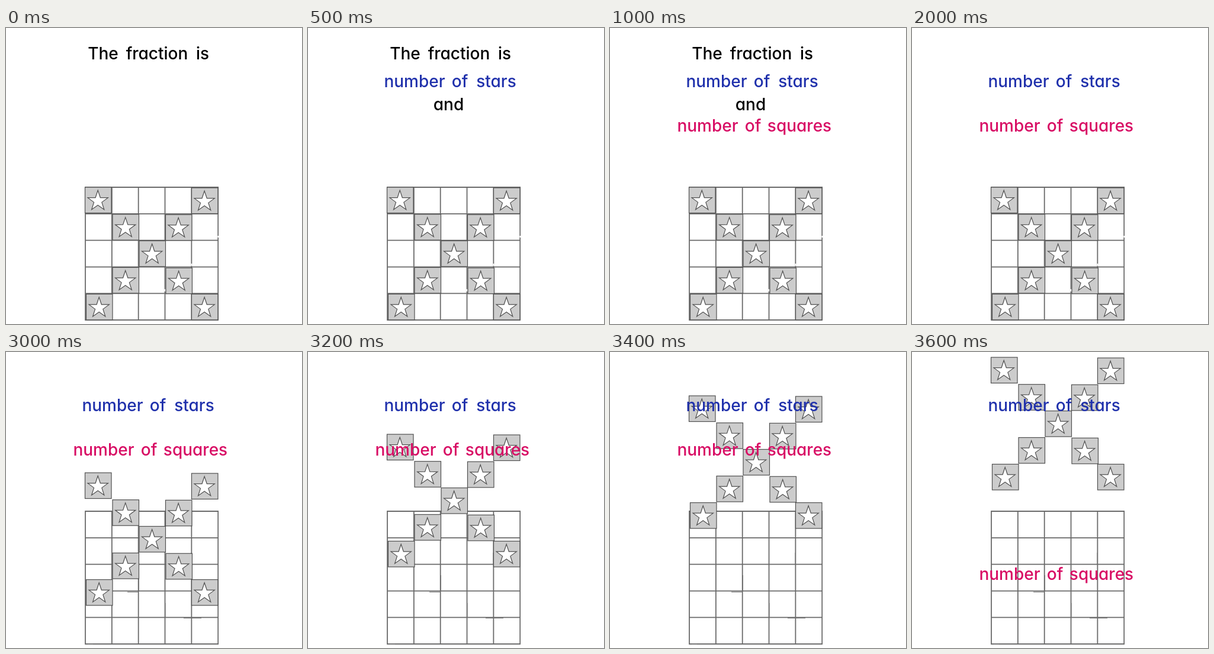
These frames come from a looping animation (500x500 px, 4600 ms). An HTML page:

```html
<!DOCTYPE html>
<html lang="en">
<head>
<meta charset="utf-8">
<title>Fraction of stars</title>
<style>
  html, body { margin: 0; width: 100%; height: 100%; overflow: hidden; background: #fff; }
  svg { display: block; width: 100%; height: 100%; }
  text { font: 500 28px Inter, "Open Sans", sans-serif; font-feature-settings: "cv11"; text-anchor: middle; }
</style>
</head>
<body>
<svg viewBox="0 0 500 500">
  <path id="grid" fill="none" stroke="#6a6a6a" stroke-width="1.8"/>
  <path id="gaps" d="M313.5 398v4M358.5 351v3M268.5 441v4" stroke="#fff" stroke-width="2"/>
  <path id="ticks" d="M313 339v19M205 405.5h18M224.5 377v26M269 424v24M300 449.5h30M138 493.5h9"
        fill="none" stroke="#777"/>
  <g id="stars"></g>
  <g id="title" fill="#000"></g>
  <g id="blue" fill="#2031ac"></g>
  <g id="and" fill="#000"></g>
  <g id="pink" fill="#d80c64"></g>
</svg>
<script>
const LOOP = 4600;
const el = id => document.getElementById(id);

// Each word is centred on its own x.
function write(id, baseline, words) {
  el(id).innerHTML = words.map(([word, x]) =>
    `<text x="${x}" y="${baseline}">${word}</text>`).join('');
}
write('title', 53, [['The', 164], ['fraction', 255], ['is', 332]]);
write('blue', 100, [['number', 180], ['of', 256.5], ['stars', 318]]);
write('and', 139, [['and', 237.5]]);
write('pink', 175, [['number', 165], ['of', 241.5], ['squares', 320]]);

let lines = '';
for (let i = 0; i < 6; i++) {
  const p = 44.85 * i;
  lines += `M${134 + p} 268.2V493.8M133.2 ${269 + p}H359`;
}
el('grid').setAttribute('d', lines);

const starPoints = Array.from({ length: 10 }, (_, i) => {
  const radius = i % 2 ? 7 : 18, angle = i * Math.PI / 5;
  return `${radius * Math.sin(angle)},${-radius * Math.cos(angle)}`;
}).join(' ');

const corners = [
  [133.5, 269], [313.5, 270], [180, 314.7], [269.5, 315.3], [225, 359.5],
  [180, 404.5], [270, 405.3], [135.5, 449.5], [313.5, 449.5]
];
el('stars').innerHTML = corners.map(([x, y]) => `
  <g transform="translate(${x} ${y})" stroke="#505050" stroke-width="1.2">
    <rect width="44.5" height="43.5" fill="#ccc"/>
    <polygon points="${starPoints}" transform="translate(21.7 23.2)" fill="#fff"/>
  </g>`).join('');

const show = (id, visible) => el(id).setAttribute('visibility', visible ? 'visible' : 'hidden');
const shift = (id, dy) => el(id).setAttribute('transform', `translate(0 ${dy})`);

function draw(now) {
  const t = now % LOOP;
  const steps = t < 3000 ? 0 : Math.min(4, 1 + Math.floor((t - 3000) / 200));
  show('title', t < 2000);
  show('blue', t >= 500);
  show('and', t >= 500 && t < 2000);
  show('pink', t >= 1000);
  show('gaps', !steps);
  show('ticks', steps);
  shift('stars', -65 * steps);
  shift('pink', t < 3600 ? 0 : 210);
}

const start = performance.now();
function tick() {
  draw(performance.now() - start);
  requestAnimationFrame(tick);
}
tick();
</script>
</body>
</html>
```
